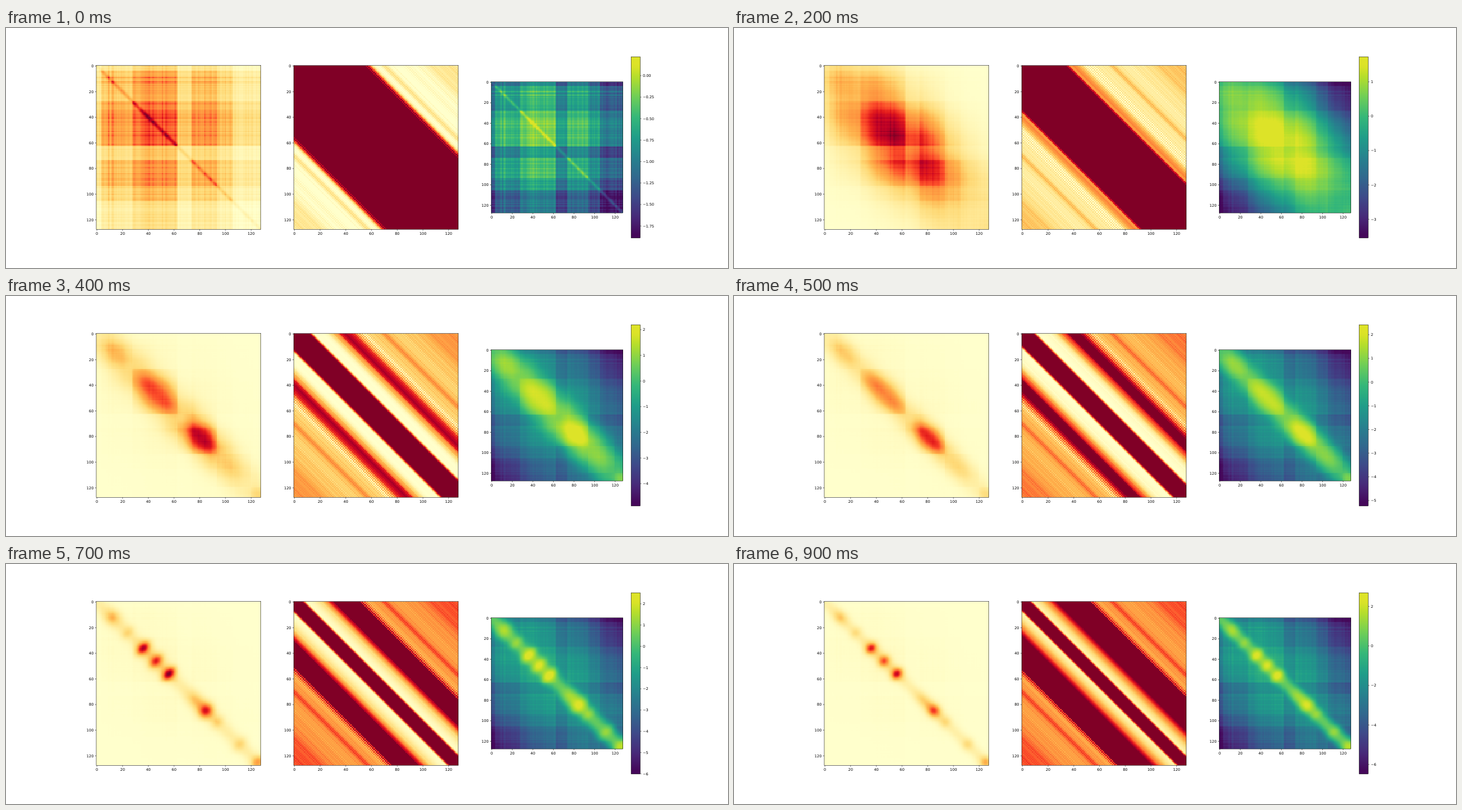
Write an HTML page with a canvas that moves like this. It is 1280 px wide and 427 px high and loops after 1 s.

```html
<!DOCTYPE html>
<html lang="en">
<head>
<meta charset="utf-8">
<title>Matrix heatmaps</title>
<style>
  html, body { margin: 0; width: 100%; height: 100%; overflow: hidden; background: #fff; }
  canvas { display: block; width: 1280px; height: 427px; }
</style>
</head>
<body>
<canvas id="stage" width="1280" height="427"></canvas>
<script>
const N = 128, STEP_MS = 100, STEPS = 10;
const ctx = document.getElementById('stage').getContext('2d');

// Log scale limits: step, low, high.
const limits = [
  [0, -1.89, 0.22], [1, -2.79, 1.56], [3, -4.3, 1.9], [4, -4.87, 2.19],
  [5, -5.23, 2.42], [7, -6.01, 2.52], [9, -6.48, 2.69]
];

// Wide domains of the early steps and small beads of the late ones: center, radius, height.
const domains = [[15, 9, .8], [46, 18, 1.3], [81, 13, 1.75], [104, 9, .7], [126, 5, .7]];
const beads = [
  [12, 5, 1.1], [24, 3, .8], [36, 4, 2], [46, 4, 1.8], [56, 4, 2.1], [76, 6, .9],
  [85, 5, 1.8], [94, 3, .8], [111, 3.5, .9], [125, 4, 1.4]
];

// Row and column profile: block starts with levels, and a few strong lines.
const blocks = [[0, -.75], [4, -.39], [28, -.19], [37, -.08], [63, -.57], [74, -.28], [94, -.52], [106, -.88]];
const lines = { 9: .16, 12: .13, 13: .12, 41: .1, 52: -.1, 75: .1, 84: .1, 113: -.1 };
const borders = [28, 63, 94, 120];

const clamp = (v, a = 0, b = 1) => Math.min(b, Math.max(a, v));
const mix = (a, b, t) => a + (b - a) * t;
const bump = (x, center, radius, power = 2) => Math.exp(-(Math.abs((x - center) / radius) ** power));
const rise = (x, a, b) => {
  const t = clamp((x - a) / (b - a));
  return t * t * (3 - 2 * t);
};
const sumOf = (list, x, power) => list.reduce((sum, [c, r, h]) => sum + h * bump(x, c, r, power), 0);
const noise = i => {
  const v = Math.sin((i + 1) * 12.9898) * 43758.5453;
  return v - Math.floor(v) - 0.5;
};
const series = (n, f) => Array.from({ length: n }, (_, i) => f(i));

function ramp(hex, lo = 0, hi = 1) {
  const stops = hex.split(' ').map(h => [0, 2, 4].map(i => parseInt(h.slice(i, i + 2), 16)));
  return series(256, i => {
    const p = clamp(i / 255, lo, hi) * (stops.length - 1);
    const k = Math.min(Math.floor(p), stops.length - 2);
    return stops[k].map((c, n) => Math.round(mix(c, stops[k + 1][n], p - k)));
  });
}
const heat = ramp('ffffcc ffeda0 fed976 feb24c fd8d3c fc4e2a e31a1c bd0026 800026');
const viridis = ramp('440154 482878 3e4989 31688e 26828e 1f9e89 35b779 6ece58 b5de2b fde725', .02, .95);

const profile = series(N, i =>
  blocks.filter(b => b[0] <= i).pop()[1] + noise(i) * 0.18 + (lines[i] || 0));

function limitsAt(step) {
  const k = Math.max(1, limits.findIndex(l => l[0] >= step));
  const [a, b] = [limits[k - 1], limits[k]];
  const t = (step - a[0]) / (b[0] - a[0]);
  return [mix(a[1], b[1], t), mix(a[2], b[2], t)];
}

// Log contact intensity: a plaid background plus a diagonal that tightens with each step.
function contacts(step) {
  const folded = step > 0;
  const level = folded ? -0.4 : 0;
  const weight = folded ? 0.7 + 0.11 * step : 1;
  const falloff = 2.6 * (1 - Math.exp(-step / 3));
  const plaid = folded ? 0.9 * Math.exp(-step / 2.5) : 1;
  const width = folded ? 6 + 140 * Math.exp(-step / 1.7) : 2;
  const gap = 5 * bump(step, 3.5, 2.5);
  const early = bump(step, 1, 1.6);
  const late = rise(step, 5, 7);

  const ridge = i => folded
    ? 0.4 + 1.3 * early * bump(i, 62, 38) + (1 - early) * (1 - late) * sumOf(domains, i, 4)
    : -0.9;
  const peak = series(N, i => ridge(i) / 2 + plaid * profile[i]);
  const bead = series(2 * N, i => late * sumOf(beads, i / 2));
  const place = series(N, i => i + gap * borders.filter(b => i >= b).length);

  return (i, j) => {
    const far = level + weight * (profile[i] + profile[j]) - falloff * (Math.abs(i - j) / 100) ** 1.5;
    const near = peak[i] + peak[j] + bead[i + j] - ((place[i] - place[j]) / width) ** 2;
    return Math.log(Math.exp(far) + Math.exp(near));
  };
}

// Middle panel: a shrinking core, a growing side band and a striped tail.
function stripes(step) {
  const core = 5 + 50 / (1 + (step / 2.2) ** 3.13);
  const inner = 3 + 1.7 * step;
  const outer = Math.min(inner, 14);
  const shoulder = 0.5 * bump(step, 2.7, 0.5);
  return series(N, d => {
    const center = 1 - rise(d, core, core + 3 + core * 0.1);
    const side = (0.1 + 0.2 * step) * bump(d, 41, d < 41 ? inner : outer);
    const tail = Math.min(0.5, 0.04 + 0.075 * step) + (d - 80) / 360
      + 0.22 * bump(d, 70.5, 2.5) - 0.09 * bump(d, 88, 9);
    const v = Math.max(center, side, tail * rise(d, 46, 64), d < 37 ? shoulder : 0);
    if (v > 0.985) return 1;
    const weave = 0.14 * bump(d, 53, 5) + (d > 60 ? 0.02 : 0);
    const grain = d > 20 ? noise(d * 3) * 0.06 + noise(Math.floor(d / 3)) * 0.08 : 0;
    return v + (d % 2 ? weave : -weave) + grain;
  });
}

const tile = document.createElement('canvas');
tile.width = tile.height = N;
const tileCtx = tile.getContext('2d');
const pixels = tileCtx.createImageData(N, N);

function panel(x, y, size, colors, value) {
  for (let j = 0, p = 0; j < N; j++) {
    for (let i = 0; i < N; i++, p += 4) {
      pixels.data.set(colors[Math.round(clamp(value(i, j)) * 255)], p);
      pixels.data[p + 3] = 255;
    }
  }
  tileCtx.putImageData(pixels, 0, 0);
  ctx.imageSmoothingEnabled = false;
  ctx.drawImage(tile, x, y, size, size);
  ctx.strokeRect(x, y, size, size);
  for (let n = 0; n < N; n += 20) {
    const d = (n + 0.5) * size / N;
    tick(x + d, y + size, 0, 1);
    label(n, x + d, y + size + 9.8, 'center');
    tick(x, y + d, -1, 0);
    label(n, x - 4.6, y + d + 2.4, 'right');
  }
}

function tick(x, y, dx, dy) {
  ctx.beginPath();
  ctx.moveTo(x, y);
  ctx.lineTo(x + dx * 2.3, y + dy * 2.3);
  ctx.stroke();
}

function label(text, x, y, align) {
  ctx.textAlign = align;
  ctx.fillText(text, x, y);
}

function colorbar(x, y, w, h, lo, hi) {
  const fill = ctx.createLinearGradient(0, y + h, 0, y);
  for (let i = 0; i <= 255; i += 5) fill.addColorStop(i / 255, `rgb(${viridis[i]})`);
  ctx.fillStyle = fill;
  ctx.fillRect(x, y, w, h);
  ctx.strokeRect(x, y, w, h);
  ctx.fillStyle = '#000';
  const gap = [0.25, 0.5, 1, 2].find(g => g * 9 >= hi - lo);
  const digits = gap < 0.5 ? 2 : gap < 1 ? 1 : 0;
  for (let n = Math.ceil(lo / gap); n * gap <= hi; n++) {
    const ty = y + h * (hi - n * gap) / (hi - lo);
    tick(x + w, ty, 1, 0);
    label((n < 0 ? '\u2212' : '') + Math.abs(n * gap).toFixed(digits), x + w + 4.6, ty + 2.4, 'left');
  }
}

function draw(step) {
  const [lo, hi] = limitsAt(step);
  const [expLo, expHi] = [Math.exp(lo), Math.exp(hi)];
  const log = contacts(step);
  const band = stripes(step);

  ctx.fillStyle = '#fff';
  ctx.fillRect(0, 0, 1280, 427);
  ctx.fillStyle = ctx.strokeStyle = '#000';
  ctx.lineWidth = 0.55;
  ctx.font = '6.58px "DejaVu Sans", sans-serif';
  panel(160, 66.6, 291.76, heat, (i, j) => (Math.exp(log(i, j)) - expLo) / (expHi - expLo));
  panel(510.1, 66.6, 291.76, heat, (i, j) => band[Math.abs(i - j)]);
  panel(860.2, 95.7, 233.4, viridis, (i, j) => (log(i, j) - lo) / (hi - lo));
  colorbar(1108.2, 51.2, 16.1, 322.4, lo, hi);
}

const start = performance.now();
let shown = -1;
function play() {
  const step = Math.floor((performance.now() - start) / STEP_MS) % STEPS;
  if (step !== shown) draw(shown = step);
  requestAnimationFrame(play);
}
play();
</script>
</body>
</html>
```
